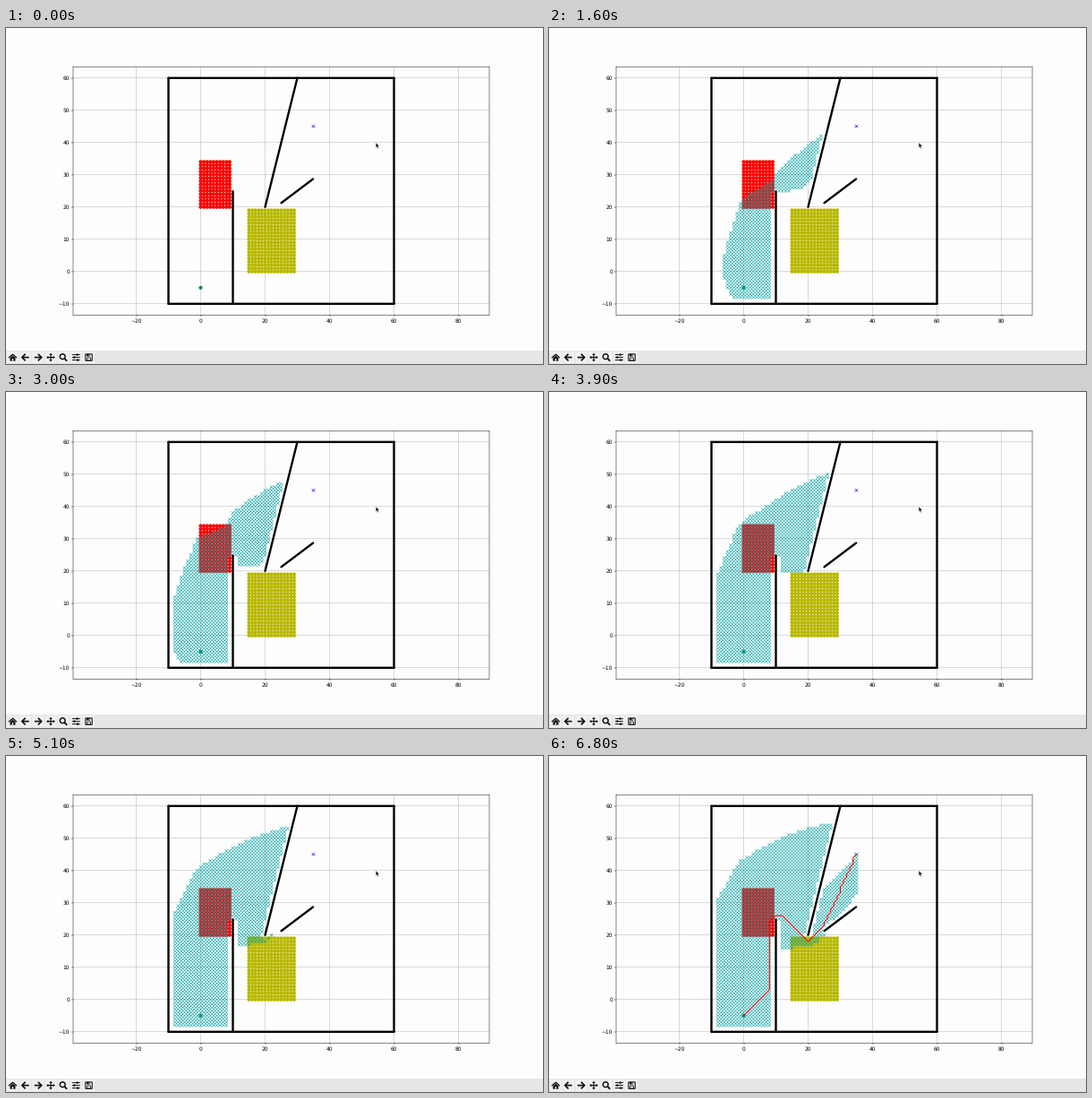
Write a matplotlib script that moves like this. It is 600 px wide and 375 px high and loops after 7800 ms.

```python
import numpy as np
import matplotlib.pyplot as plt
from matplotlib.animation import FuncAnimation
from matplotlib.collections import EllipseCollection
from matplotlib.patches import Circle, Polygon, Rectangle

PX = 0.72          # points per stage pixel at 100 dpi
PT = 0.59 * PX     # interface points, scaled to the stage
UNIT = 3.6         # pixels per grid unit
MIN, MAX = -10, 60
FRAMES, LAST = 78, 68
SLOWDOWN = 1.45    # redrawing gets slower as marks pile up

START, GOAL = (0, -5), (35, 45)
BORDER = [(MIN, MIN), (MAX, MIN), (MAX, MAX), (MIN, MAX), (MIN, MIN)]
WALLS = list(zip(BORDER, BORDER[1:])) + [
    ((10, MIN), (10, 24.9)),
    ((20, 20), (30, 60)),
    ((25, 21.25), (34.9, 28.7)),
]
MOVES = [(i, j) for i in (-1, 0, 1) for j in (-1, 0, 1) if i or j]

plt.rcParams.update({
    "font.family": "DejaVu Sans",
    "text.hinting": "none",
    "path.simplify": False,
})


# ---- A* search -------------------------------------------------------

gx, gy = np.mgrid[MIN:MAX + 1, MIN:MAX + 1].astype(float)


def at(cell):
    return cell[0] - MIN, cell[1] - MIN


def wall_distance(a, b):
    (x0, y0), (x1, y1) = a, b
    dx, dy = x1 - x0, y1 - y0
    t = ((gx - x0) * dx + (gy - y0) * dy) / (dx * dx + dy * dy)
    t = np.clip(t, 0, 1)
    return np.hypot(gx - x0 - t * dx, gy - y0 - t * dy)


def inside(x0, x1, y0, y1):
    return (gx >= x0) & (gx <= x1) & (gy >= y0) & (gy <= y1)


red_area = inside(0, 9, 20, 34)
yellow_area = inside(15, 29, 0, 19)
weight = 1 + 0.2 * red_area + 0.4 * yellow_area


def travel_cost():
    blocked = np.min([wall_distance(*w) for w in WALLS], axis=0) <= 1 + 1e-9
    cost = np.full(gx.shape, np.inf)
    cost[at(START)] = 0
    while True:
        options = [np.roll(cost, m, (0, 1)) + np.hypot(*m) * weight
                   for m in MOVES]
        new = np.minimum(cost, np.min(options, axis=0))
        new[blocked] = np.inf
        if np.array_equal(new, cost):
            return cost
        cost = new


cost = travel_cost()
total = np.round(cost + np.hypot(gx - GOAL[0], gy - GOAL[1]), 6)
goal_total = total[at(GOAL)]
# Of the cells that tie with the goal, only its own column is visited
reached = (total < goal_total) | ((total == goal_total) & (gx == GOAL[0]))
order = np.argsort(total[reached], kind="stable")
cell_x, cell_y = gx[reached][order], gy[reached][order]


def visited_count(frame):
    """Invert time = (n + c n^2) / (1 + c), both scaled to 0..1."""
    u, c = min(frame / LAST, 1), SLOWDOWN
    n = (np.sqrt(1 + 4 * c * (1 + c) * u) - 1) / (2 * c)
    return int(round(n * len(cell_x)))


def route():
    """Walk back from the goal through the parents expanded first."""
    cells = [GOAL]
    while cells[-1] != START:
        x, y = here = cells[-1]
        parents = [
            (x + i, y + j) for i, j in MOVES
            if abs(cost[at((x + i, y + j))]
                   + np.hypot(i, j) * weight[at(here)]
                   - cost[at(here)]) < 1e-6
        ]
        cells.append(min(parents, key=lambda p: total[at(p)]))
    return np.array(cells).T


def crosses(x, y):
    """Diagonal crosses as one line broken by NaNs, six points each."""
    h = 3 * 0.59 / UNIT
    dx = np.array([-h, h, np.nan] * 2)
    dy = np.array([-h, h, np.nan, h, -h, np.nan])
    return np.add.outer(x, dx).ravel(), np.add.outer(y, dy).ravel()


# ---- Plot ------------------------------------------------------------

PAPER = "#fdfdfd"
fig = plt.figure(figsize=(6, 3.75), dpi=100, facecolor=PAPER)
ax = fig.add_axes([0.125, 1 - 320.4 / 375, 0.775, 277.2 / 375],
                  facecolor=PAPER)
half_width = 232.5 / UNIT
ax.set_xlim(25 - half_width, 25 + half_width)
ax.set_ylim(-13.5, 63.5)
ax.set_xticks(range(-20, 81, 20))
ax.set_yticks(range(MIN, MAX + 1, 10))
ax.grid(True, color="#b0b0b0", lw=0.8 * PT, snap=False)
ax.tick_params(labelsize=10 * PT, length=3.5 * PT, width=0.8 * PT,
               pad=3.5 * PT)
for spine in ax.spines.values():
    spine.set(linewidth=0.8 * PT, snap=False)


def dots(x, y, color):
    n = len(x)
    size = [7 * 0.59 / UNIT] * n
    ax.add_collection(EllipseCollection(
        size, size, [0] * n, units="xy", offsets=np.column_stack([x, y]),
        offset_transform=ax.transData, facecolors=color, linewidths=0,
        zorder=2), autolim=False)


def stroke(x, y, color, width, **kw):
    return ax.plot(x, y, color=color, lw=width * PT, snap=False,
                   scalex=False, scaley=False, **kw)[0]


for a, b in WALLS:
    stroke(*zip(a, b), "black", 4, solid_capstyle="round")
dots(gx[yellow_area], gy[yellow_area], "#b8b800")
dots(gx[red_area], gy[red_area], "#ff0000")
dots([START[0]], [START[1]], "#0c8c3c")
stroke(*crosses(*np.array([GOAL]).T), "blue", 0.9, solid_capstyle="butt")

mark_x, mark_y = crosses(cell_x, cell_y)
visited = stroke([], [], "#00a2a4", 0.85, solid_capstyle="butt", zorder=3)
path = stroke(*route(), "red", 1.7, zorder=4)


# ---- Toolbar and pointer, in stage pixels ----------------------------

INK, BAR, TILE = "#111111", "#e6e6e6", "#f0f0f0"
MID = 367.6
ui = fig.add_axes([0, 0, 1, 1])
ui.set_xlim(0, 600)
ui.set_ylim(375, 0)
ui.axis("off")


def line(points, width=1.0):
    ui.plot(*zip(*points), color=INK, lw=width * PX, snap=False,
            solid_capstyle="butt", solid_joinstyle="miter")


def box(cx, cy, w, h, color=INK, **kw):
    ui.add_patch(Rectangle((cx - w / 2, cy - h / 2), w, h, fc=color,
                           snap=False, **{"lw": 0, **kw}))


def home(x):
    line([(x - 4.5, MID + 0.6), (x, MID - 3.4), (x + 4.5, MID + 0.6)], 1.3)
    ui.add_patch(Polygon([(x - 3, MID + 4), (x - 3, MID + 0.7), (x, MID - 2),
                          (x + 3, MID + 0.7), (x + 3, MID + 4)],
                         fc=INK, lw=0))
    box(x, MID + 2.7, 1.4, 2.6, TILE)


def arrow(x, way):
    line([(x - 4 * way, MID), (x + 3.6 * way, MID)], 1.7)
    line([(x, MID - 3.8), (x + 3.8 * way, MID), (x, MID + 3.8)], 1.7)


def pan(x):
    for dx, dy in ((1, 0), (-1, 0), (0, 1), (0, -1)):
        line([(x, MID), (x + 3.5 * dx, MID + 3.5 * dy)], 1.2)
        ui.add_patch(Polygon(
            [(x + a * dx + b * dy, MID + a * dy + b * dx)
             for a, b in ((4.8, 0), (2.7, 1.9), (2.7, -1.9))], fc=INK, lw=0))


def zoom(x):
    ui.add_patch(Circle((x - 1, MID - 0.9), 2.9, fill=False, ec=INK,
                        lw=1.5 * PX))
    line([(x + 1, MID + 1.1), (x + 4, MID + 4.1)], 1.9)


def sliders(x):
    for row, knob in ((-1, 1.2), (0, -2), (1, 1.8)):
        line([(x - 4.5, MID + 3 * row), (x + 4.5, MID + 3 * row)])
        box(x + knob, MID + 3 * row, 1.8, 2.4)


def save(x):
    box(x, MID, 7.4, 7.4, TILE, ec=INK, lw=1.1 * PX)
    box(x - 0.4, MID - 2.3, 4, 2.6)
    box(x + 0.6, MID - 2.3, 1, 1.6, TILE)
    box(x, MID + 1.9, 3.8, 2.8, TILE, ec=INK, lw=0.8 * PX)


box(300, MID, 600, 15.2, BAR)
icons = [home, lambda x: arrow(x, -1), lambda x: arrow(x, 1), pan, zoom,
         sliders, save]
for i, icon in enumerate(icons):
    center = 7.5 + 14.17 * i
    box(center, MID, 12.6, 12.6, TILE)
    icon(center)

tip_x, tip_y = 413.2, 127.8
ui.add_patch(Polygon(
    [(tip_x + dx, tip_y + dy) for dx, dy in
     ((0, 0), (0, 5.8), (1.2, 4.7), (2.1, 6.7), (3, 6.3), (2.2, 4.4),
      (3.8, 4.2))], fc="black", ec="white", lw=0.3 * PX))


# ---- Animation -------------------------------------------------------

def update(frame):
    n = 6 * visited_count(frame)
    visited.set_data(mark_x[:n], mark_y[:n])
    path.set_visible(frame >= LAST)
    return visited, path


anim = FuncAnimation(fig, update, frames=FRAMES, interval=100,
                     init_func=lambda: update(0), repeat=True,
                     repeat_delay=0)
plt.show()
```
